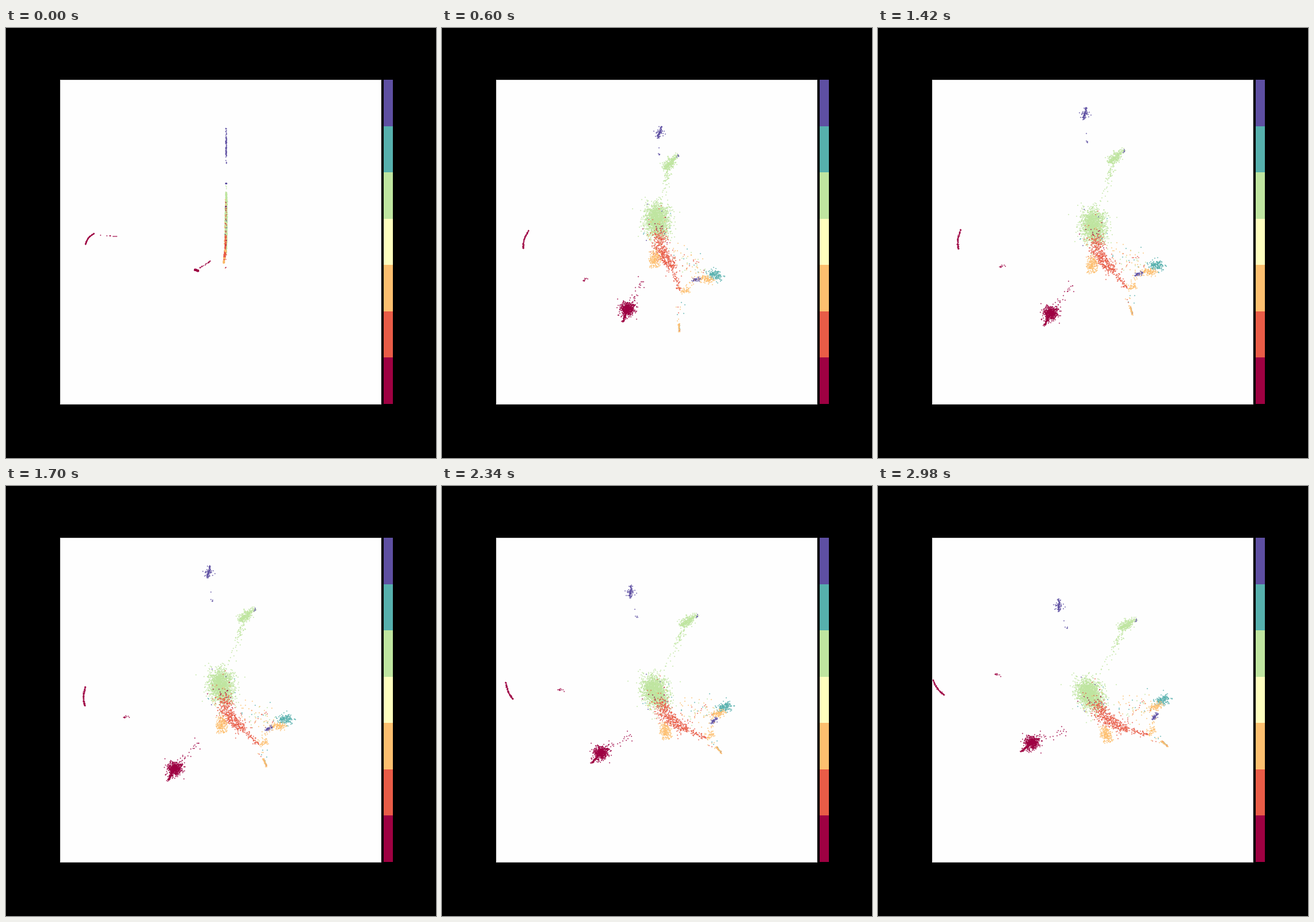
These frames come from a looping animation (748 by 748 pixels, 3.03 s). A matplotlib script:

```python
import numpy as np
import matplotlib.pyplot as plt
from matplotlib.animation import FuncAnimation

SIZE, DPI = 748, 100
STEPS, TICK = 150, 20
KEY_MS = np.array([0, 600, 1700, 2980])
TAU = np.sqrt(KEY_MS)          # fast at first, slow later
PALETTE = plt.get_cmap("Spectral")([0, 42, 85, 127, 170, 212, 255])
RED, CORAL, ORANGE, GREEN, TEAL, VIOLET = 0, 1, 2, 4, 5, 6

rng = np.random.default_rng(7)


def spine(y):
    """Point on the line where most of the data starts."""
    return 382.5 - max(0, y - 375) / 8, y


def joint(*keys):
    """Moving anchor: a smooth path through its positions at the key times."""
    p = np.array(keys, float)
    v = np.gradient(p, TAU, axis=0)
    v[-1] = 0

    def at(ms):
        x = np.sqrt(ms)
        j = min(np.searchsorted(TAU, x, side="right") - 1, len(TAU) - 2)
        h = TAU[j + 1] - TAU[j]
        s = (x - TAU[j]) / h
        pos = ((1 + 2 * s) * (1 - s) ** 2 * p[j] + s * (1 - s) ** 2 * h * v[j]
               + s * s * (3 - 2 * s) * p[j + 1] + s * s * (s - 1) * h * v[j + 1])
        # the layout first bursts apart vertically, then settles
        pos[1] += 0.15 * (pos[1] - 330) * np.sin(np.pi * min(ms / 600, 1))
        return pos
    return at


def growth(ms):
    return 1 - np.exp(-ms / 110)


def bone(a, b, lo=0, hi=1, bow=0):
    """Placement along the line from joint a to joint b."""
    def place(ms, u):
        p, q = a(ms), b(ms)
        d = q - p
        s = (lo + (hi - lo) * u)[:, None]
        normal = np.array([-d[1], d[0]]) / np.hypot(*d)
        return p + d * s + normal * bow * 4 * s * (1 - s)
    return place


def ray(j, lo, hi, tilt=0):
    """Placement along a short line through j, at a fixed angle to the core."""
    def place(ms, u):
        p = j(ms)
        dx, dy = p - core(ms)
        a = np.arctan2(dy, dx) - np.radians(tilt)
        return p + np.outer((lo + (hi - lo) * u) * growth(ms), [np.cos(a), np.sin(a)])
    return place


parts, labels = [], []


def add(n, mix, spread, place, stretch=(0, 0)):
    """n points around a placement; stretch is their half extent at the start."""
    first = np.outer(rng.uniform(-1, 1, n), stretch)
    parts.append((place, rng.random(n), spread * rng.normal(size=(n, 2)), first))
    labels.append(rng.choice(np.atleast_1d(mix), n))


core = joint(spine(338), (374, 332), (374, 345), (367, 360))
elbow = joint(spine(388), (379, 385), (383, 395), (393, 402))
arm = joint(spine(398), (399, 414), (409, 421), (428, 422))
hinge = joint(spine(408), (414, 457), (440, 449), (470, 432))
lobe = joint(spine(405), (369, 402), (374, 415), (396, 432))
drop = joint(spine(405), (412, 521), (450, 481), (498, 448))
teal = joint(spine(386), (474, 429), (485, 405), (494, 372))
wing = joint(spine(400), (459, 436), (473, 417), (482, 383))
violet = joint(spine(270), (443, 437), (458, 421), (482, 400))
leaf = joint(spine(310), (397, 233), (418, 224), (433, 240))
top = joint(spine(198), (378, 181), (352, 149), (314, 207))
berry = joint((331, 421), (322, 488), (293, 491), (267, 446))
arc_top = joint((153, 357), (151, 351), (138, 348), (95, 336))
arc_end = joint((138, 376), (141, 383), (137, 382), (115, 363))
far = joint((180, 361), (249, 437), (209, 401), (208, 328))

# central mass
add(1500, GREEN, 9.5, bone(core, elbow, -0.3, 0.4), (0, 36))
add(250, GREEN, 14, bone(core, elbow, -0.3, 0.4), (0, 36))
add(55, [RED, CORAL, CORAL, ORANGE, TEAL, VIOLET], 14, bone(core, elbow, 0, 0.6), (0, 50))

# neck, arm, chain and lobe
add(150, CORAL, 7, bone(core, elbow, 0.45, 1))
add(270, CORAL, 6, bone(elbow, arm))
add(70, CORAL, 2.5, bone(arm, hinge))
add(190, ORANGE, 4.4, ray(lobe, -10, 10))
add(38, ORANGE, 2.6, ray(hinge, 0, 16, 78))
add(14, ORANGE, 4, bone(hinge, violet, 0.2, 0.8))

# lower tail
tail_mix = [ORANGE, ORANGE, CORAL, TEAL]
add(45, tail_mix, 0.7, ray(drop, -8, 8, -8))
add(11, tail_mix, 4.5, bone(drop, hinge, 0, 0.7))

# right-hand wing
add(150, TEAL, 4.3, ray(teal, -9, 9, 25))
add(105, ORANGE, 3.6, ray(wing, -10, 10, 33))
add(45, VIOLET, 1.9, ray(violet, -7, 7, 77))
add(62, [ORANGE, ORANGE, ORANGE, GREEN, TEAL, CORAL], 11, bone(elbow, teal, 0.25, 0.8))

# upper streak and its bridge to the core
add(120, GREEN, 1.6, ray(leaf, -17, 18, -32), (0, 25))
add(165, GREEN, 4.2, ray(leaf, -14, 5, -32), (0, 25))
add(5, VIOLET, 1.5, ray(leaf, 14, 22, -40))
add(42, GREEN, 3.8, bone(leaf, core, 0.1, 0.32))
add(24, GREEN, 5, bone(leaf, core, 0.3, 0.75), (0, 60))

# top group
add(50, VIOLET, 1.2, ray(top, -10, 10, -22), (0, 25))
add(34, VIOLET, 4.2, ray(top, -5, 5, -22), (0, 25))
add(5, VIOLET, 1.5, bone(top, core, 0.12, 0.28))

# lower-left blob, far-left arc and its outliers
add(520, RED, 6, ray(berry, -4, 4), (3, 1))
add(80, RED, 0.9, ray(berry, 4, 24), (3, 1))
add(20, RED, 5, bone(berry, elbow, 0.12, 0.5))
add(75, RED, 0.5, bone(arc_top, arc_end, bow=3))
add(9, RED, 0.8, ray(far, -5, 6), (23, 2))

LABEL = np.concatenate(labels)


def positions(step):
    ms = step * TICK
    grow = growth(ms)
    return np.concatenate([place(ms, u) + off * (0.06 + 0.94 * grow) + first * (1 - grow)
                           for place, u, off, first in parts])


def panel(x0, y0, x1, y1, color):
    ax = fig.add_axes([x0 / SIZE, 1 - y1 / SIZE, (x1 - x0) / SIZE, (y1 - y0) / SIZE],
                      facecolor="#fefefe")
    ax.spines[:].set(color=color, linewidth=72 / DPI)
    return ax


fig = plt.figure(figsize=(SIZE / DPI, SIZE / DPI), dpi=DPI, facecolor="black")
ax = panel(94, 90, 652, 654, "0.8")
ax.set(xlim=(94, 652), ylim=(654, 90), xticks=[], yticks=[])

bar = panel(657, 90, 673, 654, "none")
bar.barh(range(7), 1, height=1, align="edge", color=PALETTE, linewidth=0)
bar.set(xlim=(0, 1), ylim=(0, 7), xticks=[], yticks=[])

dots = {c: ax.plot([], [], "o", color=PALETTE[c], markersize=1.8 * 72 / DPI,
                   markeredgewidth=0)[0]
        for c in (TEAL, GREEN, VIOLET, CORAL, ORANGE, RED)}


def draw(i):
    xy = positions(min(i // 2, STEPS - 1))
    for c, line in dots.items():
        line.set_data(*xy[LABEL == c].T)
    return list(dots.values())


# 10 ms ticks: two per step, and the last step is held for 50 ms
anim = FuncAnimation(fig, draw, frames=303, interval=10, repeat=True,
                     cache_frame_data=False)
plt.show()
```
